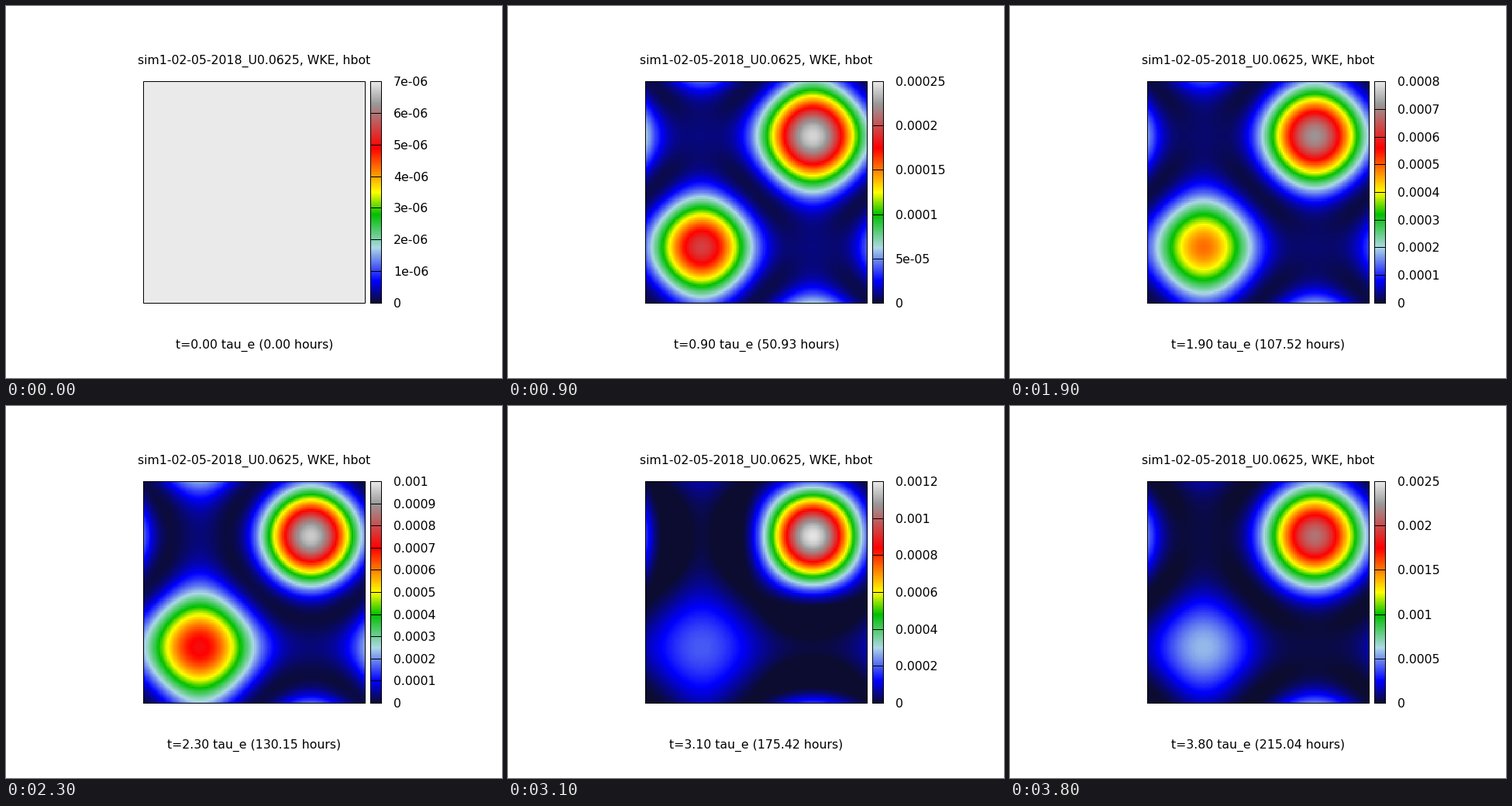
Write a matplotlib script that moves like this. It is 640 px wide and 480 px high and loops after 3900 ms.

```python
import math

import numpy as np
import matplotlib.pyplot as plt
from matplotlib.animation import FuncAnimation
from matplotlib.collections import LineCollection
from matplotlib.colors import LinearSegmentedColormap
from matplotlib.patches import Rectangle

plt.rcParams["font.family"] = "DejaVu Sans"

W, H, DPI = 640, 480, 100
FRAMES, INTERVAL = 39, 100
PX = 72 / DPI
FONT = 15.8 * PX
TOP, BOTTOM = 97.5, 383.5
PLOT_X = (177.5, 463.5)
BAR_X = (470.5, 484.5)
CELLS = 128
HOURS_PER_TAU = 56.5884
START_ENERGY = 6.99e-6

PALETTE = LinearSegmentedColormap.from_list("energy", [
    (0.0, "#0c0c30"), (0.1, "#0000ff"), (0.25, "#add8e6"), (0.4, "#00c000"),
    (0.5, "#ffff00"), (0.7, "#ff0000"), (0.9, "#999999"), (1.0, "#eaeaea")], N=512)

# Wave amplitude (1e-2) at the centre of the two eddies
KEY_TIMES = [0, 5, 9, 14, 23, 31, 38]
SW_AMP = [0, 1.16, 1.40, 1.64, 2.68, 1.40, 2.40]
NE_AMP = [0, 0.71, 1.56, 2.14, 3.10, 3.45, 4.61]

phase = np.sin(2 * np.pi * np.arange(CELLS) / CELLS)
SX, SY = np.meshgrid(phase, phase)
PSI, CROSS = SX + SY, SX * SY


def flank_curve(peak, flank, saddle):
    """Quadratic through saddle (-1), flank (0) and peak (1)."""
    return np.array([flank, (peak - saddle) / 2, (peak + saddle) / 2 - flank])


def energy(n):
    sw = np.interp(n, KEY_TIMES, SW_AMP) ** 2
    ne = np.interp(n, KEY_TIMES, NE_AMP) ** 2
    saddle, centre = 0.05 * min(sw, ne), 0.02 * min(sw, ne)

    # the eddies take turns being broad and narrow
    skew = 0.045 + 0.08 * math.cos(2 * math.pi * (n - 29) / 32)
    a = flank_curve(sw, sw * (0.5 + skew) ** 2, saddle)
    b = flank_curve(ne, ne * (0.5 - skew) ** 2, saddle)
    even, odd = (a + b) / 2, (a - b) / 2
    e2 = even[0] - centre
    e1 = even[1] - 2 * e2
    e3 = even[2] - e2
    waves = (centre + e1 * CROSS + e2 * PSI ** 2 + e3 * CROSS ** 2
             + PSI * (odd[0] + odd[2] * CROSS))
    return np.maximum(waves, 0) * 1e-4 + START_ENERGY * max(0, 1 - n / 5)


def tick_step(top):
    power = 10.0 ** math.floor(math.log10(top))
    room = 20 * power / top
    for limit, step in ((10, 0.2), (4, 0.5), (2, 1)):
        if room > limit:
            return step * power
    return 2 * power


fig = plt.figure(figsize=(W / DPI, H / DPI), dpi=DPI, facecolor="white")
ax = fig.add_axes([0, 0, 1, 1])
ax.axis("off")


def panel(data, xs):
    """Colour image with a one-pixel border centred on its outer pixels."""
    image = ax.imshow(data, cmap=PALETTE, origin="lower", aspect="auto",
                      interpolation="nearest",
                      extent=(xs[0] - 0.5, xs[1] + 0.5, BOTTOM + 0.5, TOP - 0.5))
    ax.add_patch(Rectangle((xs[0], TOP), xs[1] - xs[0], BOTTOM - TOP, fill=False,
                           ec="black", lw=PX, snap=False, zorder=5))
    return image


def label(x, y, text="", ha="center"):
    return ax.text(x, y, text, ha=ha, va="baseline", fontsize=FONT, color="black")


field_image = panel(energy(0), PLOT_X)
panel(np.linspace(0, 1, 287)[:, None], BAR_X)
ticks = LineCollection([], colors="black", linewidths=PX, snap=False, zorder=5)
ax.add_collection(ticks, autolim=False)
label(320.5, 75, "sim1-02-05-2018_U0.0625, WKE, hbot")
clock = label(320.5, 442)
tick_labels = [label(500, 0, ha="left") for _ in range(12)]
ax.set_xlim(0, W)
ax.set_ylim(H, 0)


def draw(n):
    field = energy(n)
    peak = field.max()
    step = tick_step(peak)
    count = math.ceil(peak / step - 1e-9)
    field_image.set_data(field)
    field_image.set_clim(0, count * step)

    lines = []
    for i, text in enumerate(tick_labels):
        text.set_visible(i <= count)
        if i <= count:
            y = round((BOTTOM - TOP) * (1 - i / count)) + TOP
            lines.append([(BAR_X[0], y), (BAR_X[1], y)])
            text.set_text("%g" % (i * step))
            text.set_y(y + 5.5)
    ticks.set_segments(lines)

    tau = n / 10
    clock.set_text(f"t={tau:.2f} tau_e ({tau * HOURS_PER_TAU:.2f} hours)")
    return [field_image, ticks, clock, *tick_labels]


anim = FuncAnimation(fig, draw, frames=FRAMES, interval=INTERVAL,
                     repeat=True, repeat_delay=0, blit=False)
plt.show()
```
